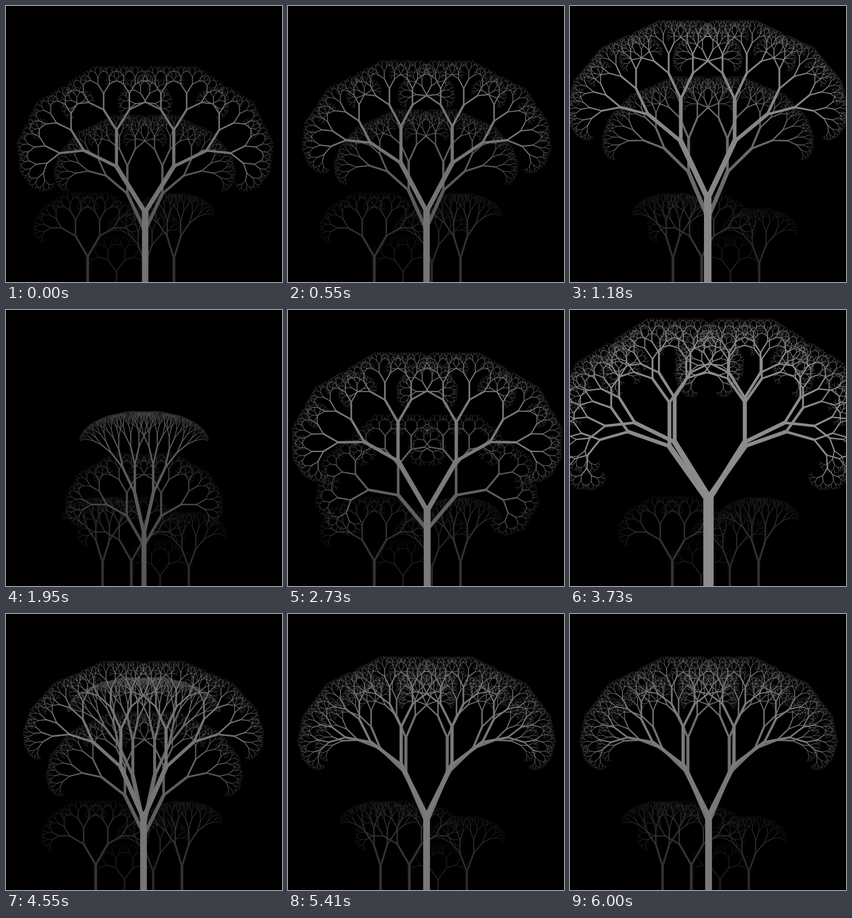
Recreate the animation shown at these times as an HTML page with a canvas. Size 480 px wide and 480 px high, loop 6050 ms.

```html
<!DOCTYPE html>
<html lang="en">
<head>
<meta charset="utf-8">
<title>Fractal trees</title>
<style>
  html, body { margin: 0; width: 100%; height: 100%; overflow: hidden; background: #000; }
  canvas { display: block; width: 100vw; height: 100vh; }
</style>
</head>
<body>
<canvas id="stage" width="480" height="480"></canvas>
<script>
const ctx = document.getElementById('stage').getContext('2d');
const LOOP = 6050;
const RATIO = 0.67;
const GROUND = 499;

const tree = (x, size, angle) => ({ x, size, angle });

// at: start in ms, grove: x of the tallest far tree, near: the large trees
const scenes = [
  { at: 0, grove: 142, near: [tree(242, 94, 32), tree(241.5, 72, 25)] },
  { at: 450, grove: 150, near: [tree(241, 95, 28), tree(240, 74, 24)] },
  { at: 1180, grove: 229, near: [tree(239.5, 110, 25.2), tree(240, 87, 22.8)] },
  { at: 1860, grove: 218, near: [tree(240, 73, 12.6), tree(240, 59.7, 30)] },
  { at: 2730, grove: 150, near: [tree(242, 100.4, 30.3), tree(242, 78.4, 40)] },
  { at: 3590, grove: 178, near: [tree(238.5, 113.5, 35.3), tree(243, 115, 32)] },
  { at: 4550, grove: 156, near: [tree(239, 96.8, 24), tree(239.5, 88, 12.4), tree(240.5, 76.8, 26)] },
  { at: 5410, grove: 211, near: [tree(241, 99, 26.5), tree(241, 92, 23)] }
];

// Four far trees, spread evenly over a strip 200 wide and getting smaller
function farTrees(first) {
  return Array.from({ length: 4 }, (_, i) => tree(
    140 + (first - 140 + 150 * i) % 200,
    42 - 1.9 * i * i,
    30 - 14 * Math.sin(1.2 * i)
  ));
}

function drawTree({ x, size, angle }) {
  const turn = angle * Math.PI / 180;
  const grey = Math.round(size * 1.22);
  let tips = [{ x, y: GROUND, dir: 0 }];
  let length = size / RATIO;
  let width = size * 0.118;

  ctx.strokeStyle = `rgb(${grey}, ${grey}, ${grey})`;
  while (length > 1.8) {
    const next = [];
    ctx.lineWidth = width;
    ctx.beginPath();
    for (const tip of tips) {
      const ex = tip.x + length * Math.sin(tip.dir);
      const ey = tip.y - length * Math.cos(tip.dir);
      ctx.moveTo(tip.x, tip.y);
      ctx.lineTo(ex, ey);
      next.push({ x: ex, y: ey, dir: tip.dir - turn }, { x: ex, y: ey, dir: tip.dir + turn });
    }
    ctx.stroke();
    tips = next;
    length *= RATIO;
    width *= 0.7;
  }
}

function drawScene({ grove, near }) {
  ctx.fillStyle = '#000';
  ctx.fillRect(0, 0, 480, 480);
  ctx.lineCap = 'round';
  // Short trees stand further back
  [...farTrees(grove), ...near].sort((a, b) => a.size - b.size).forEach(drawTree);
}

let shown = null;

function tick() {
  const time = performance.now() % LOOP;
  const scene = scenes.filter(s => s.at <= time).pop();
  if (scene !== shown) {
    drawScene(scene);
    shown = scene;
  }
  requestAnimationFrame(tick);
}

tick();
</script>
</body>
</html>
```
